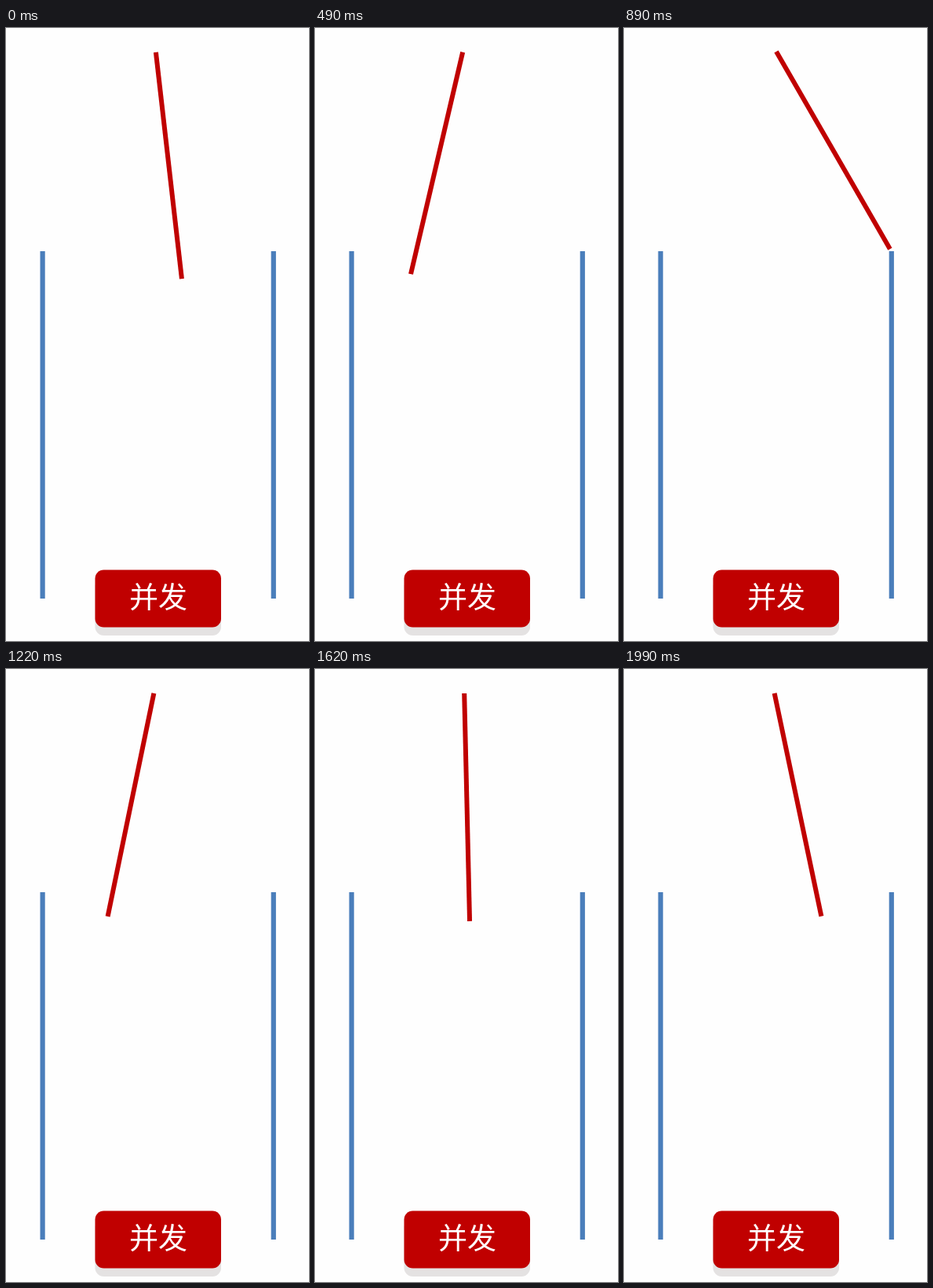
An HTML page for the animation above (2.03 s loop, 386 by 780 pixels).

```html
<!DOCTYPE html>
<html lang="zh-CN">
<head>
<meta charset="utf-8">
<title>并发</title>
<style>
  html, body { margin: 0; width: 100%; height: 100%; overflow: hidden; background: #fefefe; }
  svg { display: block; width: 386px; height: 780px; }
  .wall { stroke: #4a7ebb; stroke-width: 6.2; }
  #arm { stroke: #c00000; stroke-width: 6; }
  .shadow { fill: #e4e2e2; }
  .face { fill: #c00000; }
  text { font: 37px "Noto Sans CJK SC", "Noto Sans CJK", sans-serif; fill: #fff; text-anchor: middle; }
</style>
</head>
<body>
<svg viewBox="0 0 386 780">
  <path class="wall" d="M46.6 284V726M340.8 284V726"/>
  <line id="arm" x1="190" y1="31" x2="190" y2="321"/>
  <rect class="shadow" x="113.5" y="700" width="160.5" height="73" rx="11"/>
  <rect class="face" x="113.5" y="689.5" width="160.5" height="73" rx="11"/>
  <text x="194" y="738">并发</text>
</svg>
<script>
  const LOOP = 2030;
  const PIVOT = "190 23";
  // [time in ms, swing in degrees, positive to the right]
  const KEYS = [[0, 6.54], [54, 6.54], [346, -30], [825, 30.1], [889, 30.1],
                [1365, -30], [1853, 30], [LOOP, 6.6]];
  const arm = document.getElementById("arm");
  const start = performance.now();

  // The pose holds between ticks, which fall on whole hundredths of a second.
  const tick = k => k < 0 ? 0 : Math.round((78.4 + 40.64 * k) / 10) * 10;

  function snap(t) {
    let k = Math.min(47, Math.ceil(t / 40.64));
    while (tick(k) > t) k--;
    return tick(k);
  }

  function swing(t) {
    const i = KEYS.findIndex(key => key[0] > t);
    const [t0, a0] = KEYS[i - 1], [t1, a1] = KEYS[i];
    return a0 + (a1 - a0) * (t - t0) / (t1 - t0);
  }

  function draw() {
    const t = (performance.now() - start) % LOOP;
    arm.setAttribute("transform", `rotate(${-swing(snap(t))} ${PIVOT})`);
    requestAnimationFrame(draw);
  }
  draw();
</script>
</body>
</html>
```
